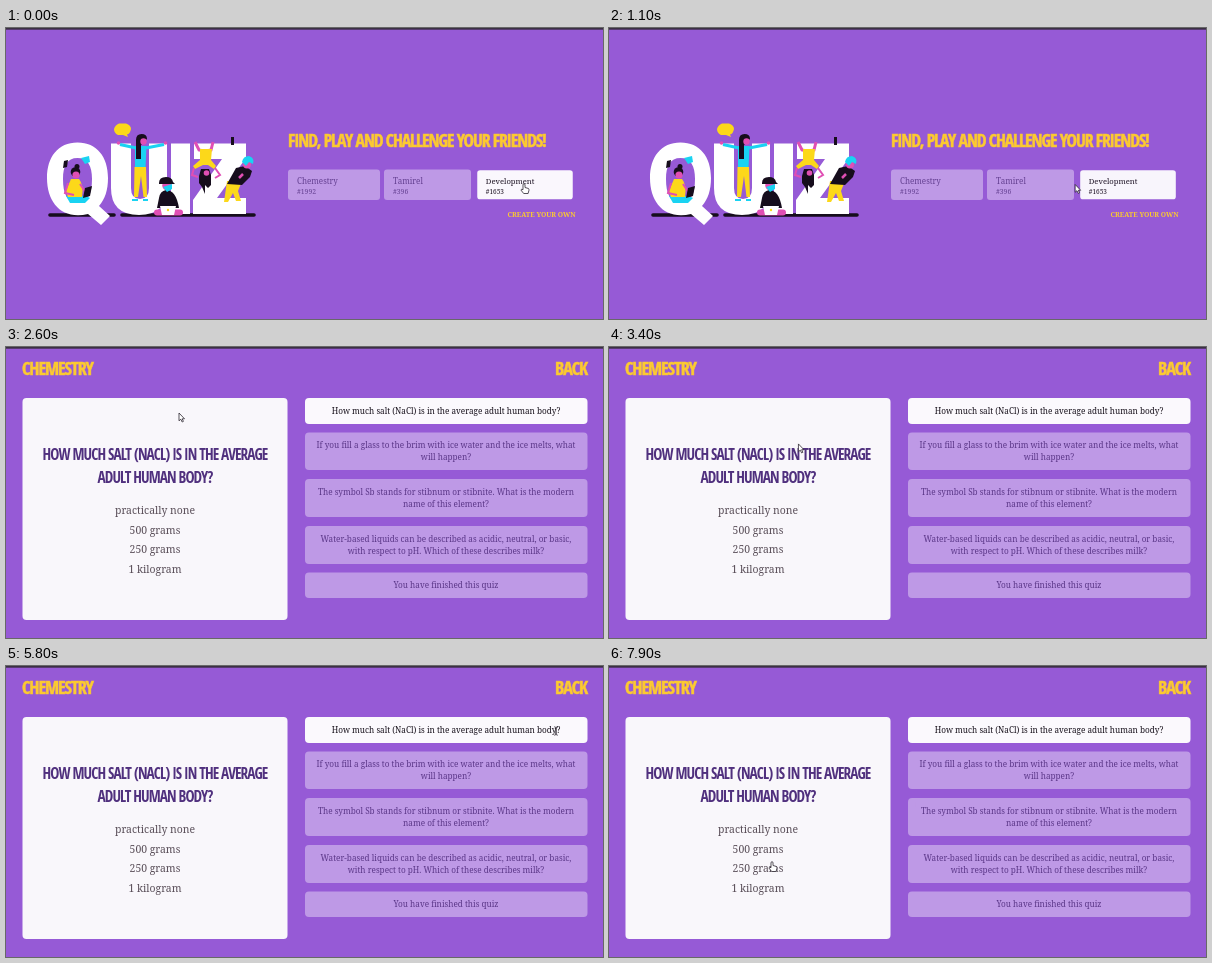
Animation, 597 px wide and 291 px high, one loop 8 s. Source, as an HTML page:

```html
<!DOCTYPE html>
<html lang="en">
<head>
<meta charset="utf-8">
<title>Quiz</title>
<style>
html, body { margin: 0; width: 100%; height: 100%; overflow: hidden; background: #965ad6; }
svg { display: block; width: 100vw; height: 100vh; }
text { font-family: "Noto Serif", "Liberation Serif", serif; font-weight: 500; }
.caps { letter-spacing: -.06em; }
.heavy { font-weight: 800; stroke: #fcca30; stroke-width: .5; }
</style>
</head>
<body>
<svg id="stage" viewBox="0 0 597 291">
  <rect width="597" height="291" fill="#965ad6"/>
  <rect width="597" height="1.700" fill="#3b3044"/>

  <g id="home">
    <g stroke="#160d1c" stroke-width="3.600" stroke-linecap="round">
      <path d="M44 187H108M116 187H248"/>
    </g>
    <g fill="#fff" aria-label="QUIZ">
      <path fill-rule="evenodd" d="M71.500 114.500C91 114.500 102 129 102 150C102 162 99 171 93 178L104 188L95 197L82 186C56 192 41 175 41 150C41 129 52 114.500 71.500 114.500ZM71.500 130C61 130 57 138 57 151C57 166 61 174 71.500 174C82 174 86 166 86 151C86 138 82 130 71.500 130Z"/>
      <path d="M105 115.500H125V160Q125 171 134 171Q143 171 143 160V115.500H161V160Q161 187 133 187Q105 187 105 160Z"/>
      <path d="M165 115.500H184V186H165Z"/>
      <path d="M188 115.500H240V130L211 170H240V186H187V172L216 131H188Z"/>
    </g>

    <!-- speech bubble -->
    <path d="M113 95.500H120Q125 97 125 101Q124 106 121 106.500L122 109L117 107H112Q108 105 108 101Q109 97 113 95.500Z" fill="#fcd81a"/>

    <!-- reader inside the Q -->
    <path d="M58 133L62 132L61 139L57 140Z" fill="#160d1c"/>
    <path d="M75 130L83 128L84 134L79 136Z" fill="#19d3f2"/>
    <path d="M60 168H80L84 170L79 175H64Z" fill="#19d3f2"/>
    <circle cx="71" cy="138.500" r="2.500" fill="#160d1c"/>
    <circle cx="69.500" cy="144" r="4.800" fill="#160d1c"/>
    <circle cx="70" cy="147" r="3.600" fill="#e04fb4"/>
    <path d="M65 151H73Q78 157 76 169H62L60 163Z" fill="#fcd81a"/>
    <path d="M62 155L59 165L68 167M74 156L80 165" fill="none" stroke="#e04fb4" stroke-width="2"/>
    <path d="M79 160L86 158L84 168L77 170Z" fill="#160d1c"/>

    <!-- standing on the U -->
    <path d="M114 116.500L130 120M158 116.500L140 120" stroke="#19d3f2" stroke-width="3.200"/>
    <circle cx="112.500" cy="115" r="1.800" fill="#e04fb4"/>
    <circle cx="159.500" cy="115" r="1.800" fill="#e04fb4"/>
    <path d="M129 118H140.500L139.500 140H129Z" fill="#19d3f2"/>
    <path d="M130 112Q130 106 135.500 106Q141 106 141 111L135 117V131H130Z" fill="#160d1c"/>
    <circle cx="137.500" cy="113.500" r="3.200" fill="#e04fb4"/>
    <path d="M128.500 139H140L141 169H137.500L135 148L132 169H128Z" fill="#fcd81a"/>
    <path d="M126 172H132M137 172H142" stroke="#19d3f2" stroke-width="2.200"/>

    <!-- laptop worker -->
    <path d="M153 170Q154 163 160 162Q170 162 173 180H151Z" fill="#160d1c"/>
    <circle cx="161" cy="157.500" r="4.800" fill="#e04fb4"/>
    <path d="M157 159L166 156V161L161 164Z" fill="#19d3f2"/>
    <path d="M153 155Q153 149 160 149Q166 149 167 154L169 156H153Z" fill="#160d1c"/>
    <path d="M151 184.500H174" stroke="#e04fb4" stroke-width="6" stroke-linecap="round"/>
    <path d="M154 178H170L168 187H156Z" fill="#fff"/>
    <circle cx="162" cy="182" r="1.200" fill="#fcd81a"/>

    <!-- hanging upside down -->
    <path d="M189 114L193 122L198 123M207 114L205 122L200 123" fill="none" stroke="#e04fb4" stroke-width="3"/>
    <path d="M194 121H206L205 132L210 138L208 141L202 137H197L189 141L187 138L194 132Z" fill="#fcd81a"/>
    <path d="M188 140L186 147L192 149M209 140L214 147L209 150" fill="none" stroke="#e04fb4" stroke-width="2"/>
    <path d="M195 141H203L205 147V157L202 160L199 157V166L196 159L193 155V148Z" fill="#160d1c"/>
    <circle cx="200.500" cy="145" r="2.800" fill="#e04fb4"/>

    <!-- leaning on the Z -->
    <path d="M225 109H228V117H225Z" fill="#160d1c"/>
    <path d="M221 153H236L232 163L235 173H230L227 165L222 174H218Z" fill="#fcd81a"/>
    <path d="M221 156L230 140L239 138L246 143L244 149L236 157Z" fill="#160d1c"/>
    <circle cx="241" cy="136.500" r="4" fill="#e04fb4"/>
    <path d="M236 134Q237 128 243 128Q249 130 247 136L243 134L240 138Z" fill="#19d3f2"/>
    <path d="M237 146L233 150" stroke="#e04fb4" stroke-width="2.500"/>
  </g>

  <g id="quiz">
    <rect x="16.500" y="51" width="265" height="222" rx="4" fill="#f9f7fb"/>
  </g>

  <g id="cursor" stroke="#2c2630" stroke-width=".8" stroke-linejoin="round">
    <path id="hand" fill="#fff" d="M-1.500 .8Q-.5-.4 .5 .8V4L4 5Q4.600 5.500 4.400 7L3.600 10H-.8L-3.600 6.500Q-3.400 5.200-1.500 6.200Z"/>
    <path id="arrow" fill="#fff" d="M0 0V7.800L1.800 6.200L3.200 9L4.400 8.400L3.200 5.800H5.500Z"/>
    <path id="beam" fill="none" d="M-1.800-4.200Q0-4.200 0-3V3Q0 4.200-1.800 4.200M1.800-4.200Q0-4.200 0-3V3Q0 4.200 1.800 4.200"/>
  </g>
</svg>
<script>
const LOOP = 8000, PAGE_AT = 2100, FADE = 300;
const YELLOW = '#fcca30', PURPLE = '#5b3788';
const $ = id => document.getElementById(id);

function add(parent, tag, attrs, text = '') {
  const el = document.createElementNS('http://www.w3.org/2000/svg', tag);
  for (const k in attrs) el.setAttribute(k, attrs[k]);
  el.textContent = text;
  return parent.appendChild(el);
}

// Text is placed by the middle of its capitals.
function label(parent, text, x, y, style, fill, anchor = 'start') {
  return add(parent, 'text', { x, y, dy: '.36em', fill, 'text-anchor': anchor, ...style }, text);
}

// Natural length of a line at 100px, used to choose one size per text style.
function measure(text, style) {
  const el = add($('stage'), 'text', { ...style, 'font-size': 100 }, text);
  const length = el.getComputedTextLength();
  el.remove();
  return length;
}
function sized(style, sample, length) {
  return { ...style, 'font-size': (100 * length / measure(sample, style)).toFixed(2) };
}

const HEADING = 'FIND, PLAY AND CHALLENGE YOUR FRIENDS!';
const TITLE = ['HOW MUCH SALT (NACL) IS IN THE AVERAGE', 'ADULT HUMAN BODY?'];
const QUESTION = 'How much salt (NaCl) is in the average adult human body?';

// The narrowest installed sans serves as the display face.
function narrowest(cls) {
  return ['Roboto Condensed', 'Open Sans Condensed', 'Roboto', 'Open Sans', 'Noto Sans', 'Lato', 'Liberation Sans']
    .map(name => ({ class: cls, style: `font-family:"${name}",sans-serif;font-stretch:ultra-condensed` }))
    .map(style => ({ style, length: measure(HEADING, style) }))
    .sort((a, b) => a.length - b.length)[0].style;
}
const heavy = narrowest('caps heavy');

const headStyle = sized(heavy, HEADING, 258);
const navStyle = sized(heavy, 'CHEMESTRY', 71);
const titleStyle = sized(narrowest('caps'), TITLE[0], 225);
const nameStyle = sized({}, 'Development', 51);
const idStyle = sized({}, '#1992', 19);
const linkStyle = sized({ style: 'font-weight:700' }, 'CREATE YOUR OWN', 68);
const answerStyle = sized({}, 'practically none', 80);
const itemStyle = sized({}, QUESTION, 229);

// Start page
const home = $('home'), quiz = $('quiz');
label(home, HEADING, 282, 112.3, headStyle, YELLOW);
label(home, 'CREATE YOUR OWN', 501.5, 187, linkStyle, YELLOW);

const cards = [
  ['Chemestry', '#1992', 282, 92],
  ['Tamirel', '#396', 378, 87],
  ['Development', '#1653', 469, 100]
].map(([name, id, x, w]) => {
  const g = add(home, 'g', {});
  const box = add(g, 'rect', { x, y: 141.5, width: w, height: 30.5, rx: 3, fill: '#fff' });
  // The group's fill colours both lines.
  label(g, name, x + 9, 153, nameStyle, 'inherit');
  label(g, id, x + 9, 163.5, idStyle, 'inherit');
  return { g, box, x, w };
});

// Question page
label(quiz, 'CHEMESTRY', 16, 21.5, navStyle, YELLOW);
label(quiz, 'BACK', 581, 21.5, navStyle, YELLOW, 'end');
TITLE.forEach((s, i) => label(quiz, s, 149, 107.5 + 22.5 * i, titleStyle, '#50307e', 'middle'));
['practically none', '500 grams', '250 grams', '1 kilogram'].forEach((s, i) =>
  label(quiz, s, 149, 163.5 + 19.5 * i, answerStyle, '#594e58', 'middle'));

[
  [51, 26, QUESTION],
  [85.5, 37.5, 'If you fill a glass to the brim with ice water and the ice melts, what', 'will happen?'],
  [132, 38, 'The symbol Sb stands for stibnum or stibnite. What is the modern', 'name of this element?'],
  [179, 38, 'Water-based liquids can be described as acidic, neutral, or basic,', 'with respect to pH. Which of these describes milk?'],
  [225.5, 25.5, 'You have finished this quiz']
].forEach(([y, height, ...lines], n) => {
  add(quiz, 'rect', { x: 299, y, width: 282.5, height, rx: 4, fill: '#fff', 'fill-opacity': n ? .38 : .96 });
  lines.forEach((s, i) => label(quiz, s, 440, y + height / 2 + 12.3 * (i - (lines.length - 1) / 2),
    itemStyle, n ? PURPLE : '#18121c', 'middle'));
});

// Pointer path: time, x, y
const path = [
  [0, 518.5, 155.5], [60, 518, 155.5], [240, 330, 156], [290, 330, 156], [490, 556.5, 157.5],
  [850, 556.5, 157.5], [1250, 425, 156], [1700, 364.5, 152.5], [2150, 364.5, 152.5],
  [2600, 173, 66], [3500, 190, 98], [4300, 180.5, 119], [5000, 400, 92], [5600, 550, 65],
  [6100, 550, 65], [6900, 300, 130], [7500, 175, 178], [7900, 163.5, 195.5]
];

function pointer(t) {
  const i = path.findIndex(p => p[0] >= t);
  if (i < 0) return path[path.length - 1].slice(1);
  if (i === 0) return path[0].slice(1);
  const a = path[i - 1], b = path[i];
  const u = (t - a[0]) / (b[0] - a[0]), e = u * u * (3 - 2 * u);
  return [1, 2].map(k => a[k] + (b[k] - a[k]) * e);
}

const over = (card, x) => x >= card.x && x <= card.x + card.w;

// Share of the last FADE ms that the pointer spent on a card
function hover(card, t) {
  const n = 40;
  let hits = 0;
  for (let i = 0; i < n; i++) hits += over(card, pointer(Math.max(0, t - FADE * i / n))[0]);
  return hits / n;
}

function kind(x, y, onHome) {
  if (onHome) return cards.some(c => over(c, x)) ? 'hand' : 'arrow';
  const inside = (l, t, r, b) => x > l && x < r && y > t && y < b;
  if (inside(108, 156, 190, 230)) return 'hand';
  return inside(37, 99, 262, 139) || inside(305, 54, 575, 248) ? 'beam' : 'arrow';
}

function mix(a, b, u) {
  return `rgb(${a.map((v, i) => Math.round(v + (b[i] - v) * u))})`;
}

function draw() {
  const t = performance.now() % LOOP, onHome = t < PAGE_AT;
  home.style.display = onHome ? '' : 'none';
  quiz.style.display = onHome ? 'none' : '';
  if (onHome) for (const card of cards) {
    const h = hover(card, t), s = 1 - .045 * h, cx = card.x + card.w / 2;
    card.g.setAttribute('transform', `translate(${cx} 156.7) scale(${s}) translate(${-cx} -156.7)`);
    card.g.setAttribute('fill', mix([101, 65, 146], [30, 20, 36], h));
    card.box.setAttribute('fill-opacity', .38 + .57 * h);
  }
  const [x, y] = pointer(t), shown = kind(x, y, onHome);
  $('cursor').setAttribute('transform', `translate(${x} ${y})`);
  for (const id of ['hand', 'arrow', 'beam']) $(id).style.display = id === shown ? '' : 'none';
  requestAnimationFrame(draw);
}
draw();
</script>
</body>
</html>
```
